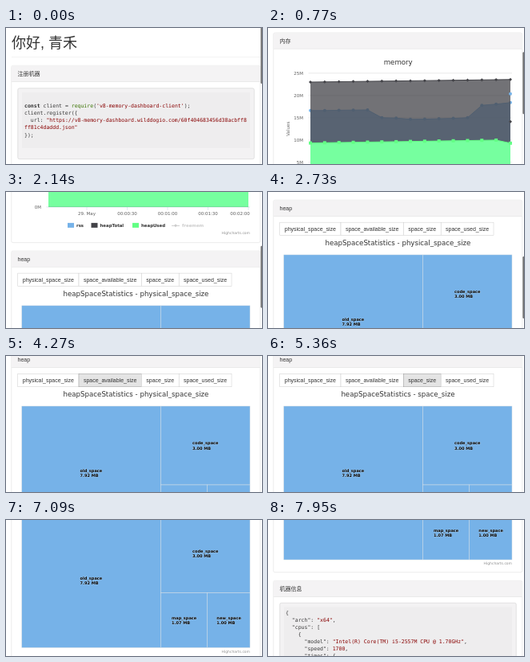
Recreate the animation shown at these times as an HTML page. Size 320x171 px, loop 8000 ms.

```html
<!DOCTYPE html>
<html lang="zh">
<head>
<meta charset="utf-8">
<title>Memory dashboard</title>
<style>
html, body { margin: 0; width: 100%; height: 100%; overflow: hidden; background: #fff; }
svg { display: block; width: 100vw; height: 100vh; }
text { white-space: pre; }
.ui { font-family: "Liberation Sans", "Noto Sans CJK SC", "Noto Sans CJK", sans-serif; }
.chart { font-family: "DejaVu Sans", sans-serif; }
.code { font-family: "DejaVu Sans Mono", monospace; }
</style>
</head>
<body>
<svg id="stage" viewBox="0 0 320 171" preserveAspectRatio="none"></svg>
<script>
const NS = "http://www.w3.org/2000/svg";
const LOOP = 8000;
const BLUE = "#76b2e8", DARK = "#434348", GREEN = "#62ff84";

function el(parent, tag, attrs = {}, text) {
  const node = document.createElementNS(NS, tag);
  for (const key in attrs) node.setAttribute(key, attrs[key]);
  if (text !== undefined) node.textContent = text;
  return parent.appendChild(node);
}
const rect = (p, x, y, width, height, fill, more = {}) =>
  el(p, "rect", { x, y, width, height, fill, ...more });
const line = (p, x1, y1, x2, y2, stroke, w = 0.5) =>
  el(p, "line", { x1, y1, x2, y2, stroke, "stroke-width": w });
// y is the visual middle of the line
const label = (p, cls, x, y, size, str, more = {}) =>
  el(p, "text", { class: cls, x, y: y + size * 0.36, "font-size": size, fill: "#333", ...more }, str);

const stage = document.getElementById("stage");
const page = el(stage, "g");

function panel(y, height, title) {
  rect(page, 6.75, y + 0.25, 311, height - 0.5, "#fff", { rx: 2, stroke: "#d8d8d8", "stroke-width": 0.5 });
  rect(page, 7, y + 0.5, 310.5, 20, "#f4f3f4", { rx: 1.5 });
  line(page, 7, y + 20.5, 317.5, y + 20.5, "#dadada");
  label(page, "ui", 14.5, y + 10.5, 7, title);
}

function pre(y, height, inner) {
  rect(page, 14.75, y + 0.25, 295.5, height, "#f3f2f3", { rx: 2, stroke: "#c8c8c8", "stroke-width": 0.5 });
  rect(page, 20, y + 5.5, 285, inner, "#eeedee");
}

// each line is a list of [text, colour, weight] runs
function code(x, y, lines) {
  lines.forEach((runs, i) => {
    const t = label(page, "code", x, y + i * 9.05, 6.5, "");
    for (const [str, fill = "#3a3a3a", weight = 400] of runs)
      el(t, "tspan", { fill, "font-weight": weight }, str);
  });
}

// heading and registration
label(page, "ui", 7, 18.5, 18, "你好, 青禾", { "font-weight": 500 });
line(page, 7, 36.5, 318, 36.5, "#e6e6e6");
const RED = "#880000";
panel(47, 131, "注册机器");
pre(75.5, 89, 70);
code(23, 98, [
  [["const", "#333", 700], [" client = "], ["require", "#397300"], ["("], ["'v8-memory-dashboard-client'", RED], [");"]],
  [["client.register({"]],
  [["  url: "], ['"https://v8-memory-dashboard.wilddogio.com/60f404683456d38acbff8', RED]],
  [['ff81c4daddd.json"', RED]],
  [["});"]]
]);

// memory chart
panel(188, 236, "内存");
label(page, "chart", 162.7, 225, 8.65, "memory", { "text-anchor": "middle" });
const BASE = 379;
for (let i = 0; i <= 5; i++) {
  const y = BASE - 28 * i;
  line(page, 50.5, y, 305, y, i ? "#d4d4d4" : "#c0d0e0");
  label(page, "chart", 44, y + 0.5, 5.5, i * 5 + "M", { "text-anchor": "end", fill: "#606060" });
}
label(page, "chart", 0, 0, 5.7, "Values",
  { "text-anchor": "middle", fill: "#707070", transform: "translate(25 309) rotate(-90)" });

const COUNT = 15;
const pointX = i => 53 + i * 250 / (COUNT - 1);
const series = fn => Array.from({ length: COUNT }, (_, i) => [pointX(i), fn(i)]);
const rss = [286, 286, 285.6, 285.4, 285.2, 295, 295.4, 297, 296.8, 296.3, 295.8, 295, 279.4, 278, 276];
const MARKS = {
  circle: (p, x, y, fill) => el(p, "circle", { cx: x, cy: y, r: 2, fill }),
  diamond: (p, x, y, fill) => el(p, "path", { d: `M${x} ${y - 2}l2 2l-2 2l-2 -2z`, fill }),
  square: (p, x, y, fill) => rect(p, x - 2, y - 2, 4, 4, fill)
};
function area(points, color, fill, opacity, mark) {
  const d = points.map(p => p.join(" ")).join("L");
  el(page, "path", { d: `M53 ${BASE}L${d}L303 ${BASE}z`, fill, "fill-opacity": opacity });
  el(page, "path", { d: "M" + d, fill: "none", stroke: color, "stroke-width": 1 });
  points.forEach(([x, y]) => MARKS[mark](page, x, y, color));
}
area(series(i => rss[i]), BLUE, BLUE, 0.75, "circle");
area(series(i => 250.2 - i * 0.23), DARK, DARK, 0.75, "diamond");
area(series(i => i === COUNT - 1 ? 327 : 326.8 - i * 0.28), GREEN, "#76ff9f", 1, "square");
MARKS.circle(page, 303, 265, BLUE);
MARKS.diamond(page, 303, 300, DARK);

[["29. May", 101], ["00:00:30", 151.5], ["00:01:00", 202], ["00:01:30", 252.5], ["00:02:00", 292.5]]
  .forEach(([str, x], i) => {
    const tick = i < 4 ? x : 303;
    line(page, tick, BASE, tick, BASE + 4, "#c0d0e0");
    label(page, "chart", x, 387, 5.5, str, { "text-anchor": "middle", fill: "#606060" });
  });
[["rss", 77, BLUE], ["heapTotal", 106.5, DARK], ["heapUsed", 158, GREEN]].forEach(([str, x, color]) => {
  rect(page, x, 399, 8, 6, color);
  label(page, "chart", x + 11, 402, 5.4, str, { "font-weight": 700 });
});
line(page, 207, 402.5, 217, 402.5, "#ccc", 1);
MARKS.diamond(page, 212, 402.5, "#ccc");
label(page, "chart", 220, 402, 5.4, "freemem", { "font-weight": 700, fill: "#ccc" });
const credit = y => label(page, "chart", 305, y, 4.5, "Highcharts.com", { "text-anchor": "end", fill: "#909090" });
credit(411.5);

// heap treemap
panel(434, 253, "heap");
const buttons = [["physical_space_size", 14.75, 91], ["space_available_size", 91, 169.3],
  ["space_size", 169.3, 216.2], ["space_used_size", 216.2, 282]].map(([str, x, end]) => {
  const box = rect(page, x, 462.25, end - x, 16.5, "#fff", { stroke: "#ccc", "stroke-width": 0.5 });
  label(page, "ui", (x + end) / 2, 470.5, 7, str, { "text-anchor": "middle" });
  return box;
});
const title = label(page, "chart", 162.5, 488, 8.65, "", { "text-anchor": "middle" });

const cell = (x, y, right, bottom) =>
  rect(page, x, y, right - x, bottom - y, BLUE, { stroke: "#d6dde4", "stroke-width": 0.5 });
function cellLabel(x, y, name, size) {
  const more = { "font-weight": 700, fill: "#000", stroke: "#fff", "stroke-width": 0.6,
    "stroke-opacity": 0.45, "paint-order": "stroke" };
  label(page, "chart", x, y - 3.2, 5.05, name, more);
  label(page, "chart", x, y + 3.2, 5.05, size, more);
}
const oldCell = cell(19.75, 503, 193.3, 671);
cell(193.3, 503, 305, 602);
cell(193.3, 602, 251.3, 671);
cell(251.3, 602, 305, 671);
cellLabel(92.5, 587, "old_space", "7.92 MB");
cellLabel(233, 552.5, "code_space", "3.00 MB");
cellLabel(207, 637, "map_space", "1.07 MB");
cellLabel(263.3, 637, "new_space", "1.00 MB");
credit(675.5);

const tip = el(page, "g");
el(tip, "path", { d: "M73.5 564.5H139.5q1.5 0 1.5 1.5V577.5q0 1.5 -1.5 1.5H109.5l-3 3l-3 -3H73.5q-1.5 0 -1.5 -1.5V566q0 -1.5 1.5 -1.5z",
  fill: "#f9f9f9", "fill-opacity": 0.88, stroke: BLUE, "stroke-width": 0.5 });
label(tip, "chart", 76, 571.8, 6, "old_space: 8306688");

// machine info
panel(697, 260, "机器信息");
pre(725, 220, 209);
code(22, 737.3, [
  [["{"]],
  [['  "arch": '], ['"x64"', RED], [","]],
  [['  "cpus": [']],
  [["    {"]],
  [['      "model": '], ['"Intel(R) Core(TM) i5-2557M CPU @ 1.70GHz"', RED], [","]],
  [['      "speed": '], ["1700", RED], [","]],
  [['      "times": {']]
]);

const bar = rect(stage, 318.4, 0, 3, 78, "#6f6f6f", { rx: 1.3 });

// [ms, scroll offset, speed in px/ms]
const PATH = [[90, 0, 0], [770, 182, 0.2], [1680, 298, 0.12], [2730, 424, 0.06],
  [3320, 440, 0], [6360, 440, 0], [7950, 621, 0.05]];
const TITLES = [[0, "physical_space_size"], [4500, "space_available_size"], [5350, "space_size"]];
const ACTIVE = [[0, -1], [3960, 1], [5150, 2]];

function scrollAt(t) {
  if (t <= PATH[0][0]) return 0;
  for (let i = 1; i < PATH.length; i++) {
    const [t0, y0, v0] = PATH[i - 1], [t1, y1, v1] = PATH[i];
    if (t > t1) continue;
    const d = t1 - t0, u = (t - t0) / d, w = 1 - u;
    return w * w * ((1 + 2 * u) * y0 + u * d * v0) + u * u * ((3 - 2 * u) * y1 - w * d * v1);
  }
  return PATH[PATH.length - 1][1];
}
const ramp = (t, from, to) => Math.min(1, Math.max(0, (t - from) / (to - from)));
const stepAt = (steps, t) => steps.filter(s => s[0] <= t).pop()[1];

function draw(t) {
  const y = scrollAt(t);
  page.setAttribute("transform", `translate(0 ${-y})`);
  bar.setAttribute("y", -8 + 0.21 * y);
  bar.setAttribute("opacity", 1 - ramp(t, 3910, 4200));
  title.textContent = "heapSpaceStatistics - " + stepAt(TITLES, t);
  const active = stepAt(ACTIVE, t);
  buttons.forEach((b, i) => {
    b.setAttribute("fill", i === active ? "#e4e4e4" : "#fff");
    b.setAttribute("stroke", i === active ? "#9a9a9a" : "#ccc");
  });
  oldCell.setAttribute("fill", t >= 5700 && t < 6450 ? "#8ecdff" : BLUE);
  tip.setAttribute("opacity", ramp(t, 5700, 5800) * (1 - ramp(t, 6450, 6800)));
}

const start = performance.now();
function tick() {
  draw((performance.now() - start) % LOOP);
  requestAnimationFrame(tick);
}
tick();
</script>
</body>
</html>
```
